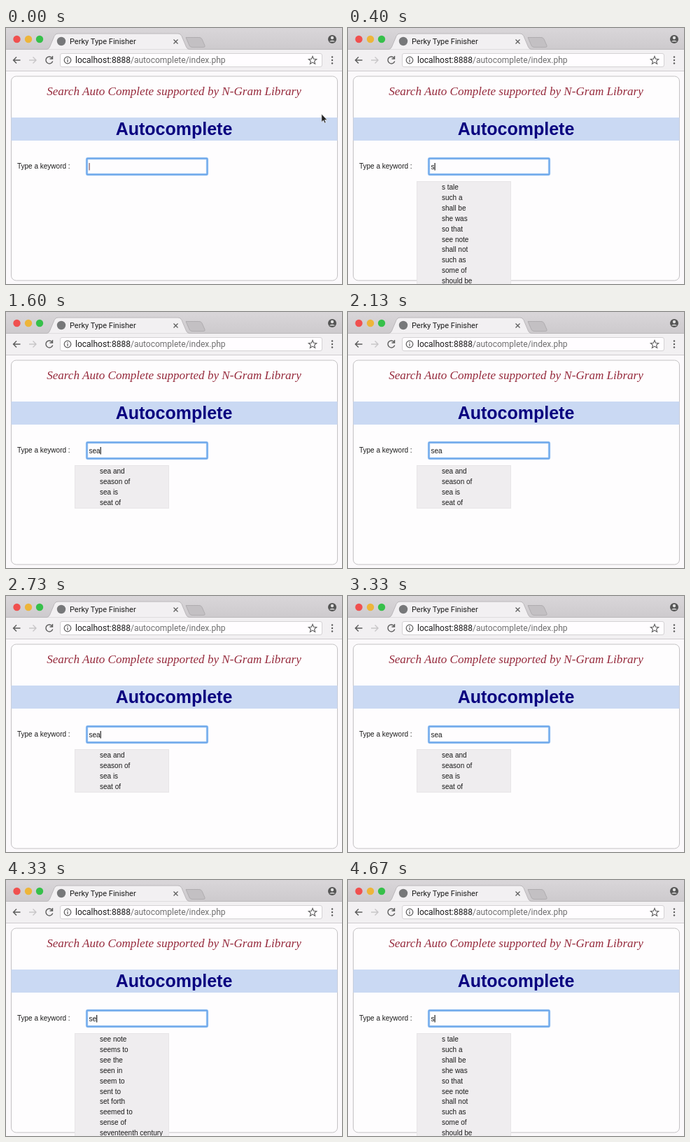
Animation, 480 px wide and 366 px high, one loop 4.79 s. Source, as an HTML page:

```html
<!DOCTYPE html>
<html lang="en">
<head>
<meta charset="utf-8">
<title>Autocomplete</title>
<style>
  html, body { margin: 0; width: 100%; height: 100%; overflow: hidden; background: #fff; }
  svg { display: block; width: 480px; height: 366px; }
  text { font-family: "Liberation Sans", Arial, sans-serif; font-size: 10px; fill: #1a1a1a; white-space: pre; }
  .ui { font-family: Roboto, sans-serif; }
  .line { fill: none; stroke: #5c5c5c; stroke-width: 1.4; }
</style>
</head>
<body>
<svg viewBox="0 0 480 366">
  <defs>
    <linearGradient id="strip" x2="0" y2="1">
      <stop stop-color="#d9d6d9"/><stop offset="1" stop-color="#cdcacd"/>
    </linearGradient>
  </defs>

  <!-- Tab strip -->
  <rect width="480" height="366" fill="#fbf9fb"/>
  <rect width="480" height="31" fill="url(#strip)"/>
  <circle cx="15.5" cy="16" r="5.2" fill="#f0504f"/>
  <circle cx="32" cy="16" r="5.2" fill="#edb53a"/>
  <circle cx="48" cy="16" r="5.2" fill="#36c04a"/>
  <path d="M257 13.5H276Q279 13.5 280 16L284 25Q285 27.5 282 27.5H266Q263 27.5 262 25Z" fill="#c3c0c3" stroke="#b0adb0"/>
  <rect y="31" width="480" height="31" fill="#f2f0f2"/>
  <path d="M0 30.5H58Q61 30.5 62.5 27L69 11.5Q70.5 8 74 8H246Q249.5 8 251 11.5L257.5 27Q259 30.5 262 30.5H480" fill="#f2f0f2" stroke="#bbb8bb"/>
  <circle cx="79" cy="19" r="6.2" fill="#77787a"/>
  <text class="ui" x="91" y="23" style="font-size:11px">Perky Type Finisher</text>
  <path d="M239.5 16.5l6 6m0-6l-6 6" class="line" style="stroke-width:1.2"/>
  <circle cx="466" cy="16" r="6" fill="#555"/>
  <circle cx="466" cy="14" r="2.2" fill="#dedede"/>
  <path d="M462 19.5a4.2 2.6 0 0 1 8 0Z" fill="#dedede"/>

  <!-- Toolbar -->
  <path d="M20.500 46H10.500m4.500-4.500l-4.500 4.500l4.500 4.500" class="line"/>
  <path d="M33 46H43m-4.500-4.500l4.500 4.500l-4.500 4.500" class="line" style="stroke:#c8c6c8"/>
  <path d="M66 43A5 5 0 1 0 66.700 47.500M66.500 40V44H62.500" class="line"/>
  <rect x="77.500" y="36.500" width="374" height="19" rx="2.500" fill="#fffdff" stroke="#d4d2d4"/>
  <circle cx="88" cy="46" r="4.800" class="line" style="stroke-width:1.200"/>
  <path d="M88 45.300v3.400M88 43v1.200" class="line" style="stroke-width:1.300"/>
  <text class="ui" x="99" y="50" style="font-size:12px">localhost:8888<tspan fill="#6e6e6e">/autocomplete/index.php</tspan></text>
  <path d="M438 40.500l1.600 3.800 4.100.3-3.100 2.700 1 4-3.600-2.200-3.600 2.200 1-4-3.100-2.700 4.100-.3Z" class="line" style="stroke-width:1.100"/>
  <g fill="#5c5c5c">
    <circle cx="466" cy="41.500" r="1.200"/><circle cx="466" cy="46" r="1.200"/><circle cx="466" cy="50.500" r="1.200"/>
  </g>
  <path d="M0 61.500H480" stroke="#cfcccf"/>

  <!-- Page -->
  <rect x="7.500" y="69" width="466" height="292" rx="7" fill="#fefdfe" stroke="#c4c2c4"/>
  <text x="240" y="96" text-anchor="middle" style="font:italic 17.100px 'Liberation Serif',serif;fill:#962a3c">Search Auto Complete supported by N-Gram Library</text>
  <rect x="7.500" y="128" width="466" height="33" fill="#cad9f3"/>
  <text x="240" y="153" text-anchor="middle" style="font-size:25px;font-weight:bold;fill:#08007f">Autocomplete</text>
  <text x="16" y="201">Type a keyword :</text>
  <rect x="115.500" y="186.500" width="172" height="23" rx="1.500" fill="#fefdfe" stroke="#b3d2f6" stroke-width="3.500"/>
  <rect x="115.500" y="186.500" width="172" height="23" rx="1" fill="none" stroke="#6aa6ea" stroke-width="1.800"/>
  <text id="typed" x="118.500" y="202"></text>
  <rect id="caret" y="193" width="1.200" height="10.500"/>
  <g id="panel">
    <rect id="sheet" x="98.500" y="219.500" width="134" fill="#efedef" stroke="#e7e5e7"/>
    <g id="rows"></g>
  </g>
  <path id="pointer" d="M450.800 123V134.500L453.400 132L455.300 136L457 135.200L455.300 131.400H458.800Z" fill="#222" stroke="#fff" stroke-width=".6"/>
</svg>
<script>
const LOOP = 4790, BLINK = 500, ROW = 14.9;
const suggestions = {
  "": [],
  s: ["s tale", "such a", "shall be", "she was", "so that", "see note", "shall not", "such as", "some of", "should be"],
  se: ["see note", "seems to", "see the", "seen in", "seem to", "sent to", "set forth", "seemed to", "sense of", "seventeenth century"],
  sea: ["sea and", "season of", "sea is", "seat of"]
};
const edits = [[0, ""], [270, "s"], [670, "se"], [1470, "sea"], [4070, "se"], [4400, "s"]];
const el = id => document.getElementById(id);
const show = (node, on) => node.setAttribute("visibility", on ? "visible" : "hidden");
let current = null;

function setWord(word) {
  const list = suggestions[word];
  el("typed").textContent = word;
  el("caret").setAttribute("x", 118.5 + (word ? el("typed").getComputedTextLength() : 0));
  el("caret").setAttribute("fill", word ? "#222" : "#85595c");
  el("sheet").setAttribute("height", list.length * ROW + 1.5);
  el("rows").replaceChildren(...list.map((label, i) => {
    const row = document.createElementNS("http://www.w3.org/2000/svg", "text");
    row.setAttribute("x", 134);
    row.setAttribute("y", 231 + i * ROW);
    row.textContent = label;
    return row;
  }));
  show(el("panel"), word);
  show(el("pointer"), !word);
}

function draw() {
  const t = performance.now() % LOOP;
  const [start, word] = edits.findLast(([time]) => time <= t);
  if (word !== current) setWord(current = word);
  show(el("caret"), Math.floor((t - start) / BLINK) % 2 === 0);
  requestAnimationFrame(draw);
}
draw();
</script>
</body>
</html>
```
